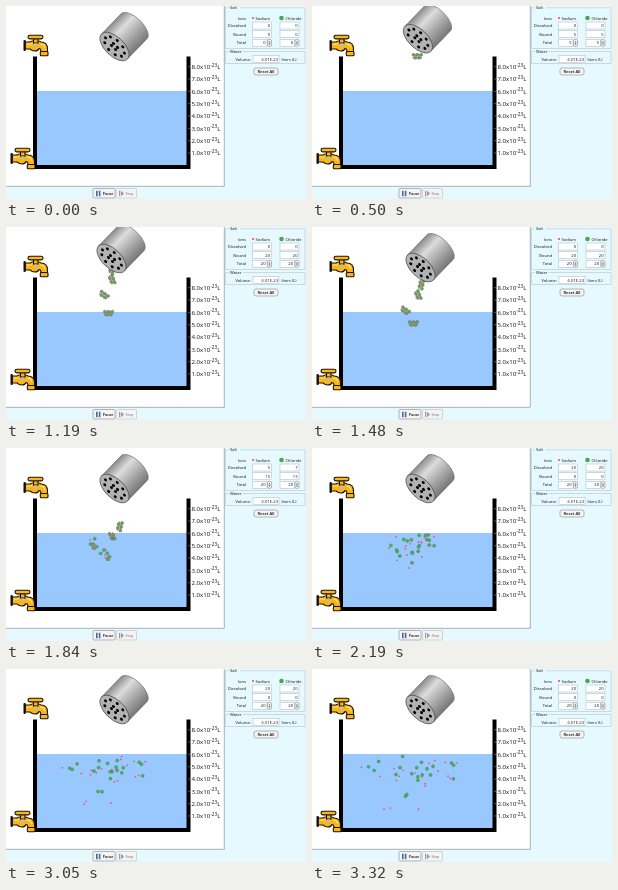
An HTML page for the animation above (3410 ms loop, 300 by 193 pixels).

```html
<!DOCTYPE html>
<html lang="en">
<head>
<meta charset="utf-8">
<title>Salt shaker</title>
<style>
html, body { margin: 0; width: 100%; height: 100%; overflow: hidden; background: #fff; }
svg { display: block; width: 100vw; height: 100vh; }
text { font-family: "Open Sans", "Noto Sans", sans-serif; font-size: 4.1px; fill: #111; }
.r { text-anchor: end; }
.m { text-anchor: middle; }
.b { font-weight: 600; }
.small { font-size: 3.7px; font-weight: 600; }
.scale { font-size: 6.1px; }
.power { font-size: 4.7px; }
.field { fill: #fff; stroke: #a9b6bf; stroke-width: .5; }
.rule { fill: none; stroke: #b5c4cb; stroke-width: .6; }
.button { fill: #f4f4f4; stroke: #888; stroke-width: .6; }
</style>
</head>
<body>
<svg viewBox="0 0 300 193" preserveAspectRatio="none">
  <defs>
    <linearGradient id="metal">
      <stop offset="0" stop-color="#8c8c8c"/>
      <stop offset=".3" stop-color="#dcdcdc"/>
      <stop offset=".65" stop-color="#a8a8a8"/>
      <stop offset="1" stop-color="#777"/>
    </linearGradient>
    <g id="faucet" stroke="#1c1400" stroke-width="1.1" fill="#f9b51c">
      <path d="M2 6H7Q9 4.500 12.500 4.500T18 6Q24.500 6 24.500 13V16H18Q18 12.500 16 12.500Q15 15 12 15T7 13H2Z"/>
      <path d="M10.500 2h4.500v5h-4.500z"/>
      <rect x="5" y="-.7" width="15" height="3.600" rx="1.800"/>
      <rect x="17.300" y="15.500" width="7.700" height="4.300" rx="1"/>
      <path d="M4 8H9M17 8Q21 8 22 12" fill="none" stroke="#ffe58a"/>
      <circle cx="12.700" cy="9" r="1.800" fill="#a5c4dc" stroke="none"/>
      <rect x=".5" y="4" width="2.300" height="11" rx="1" fill="#111" stroke="none"/>
    </g>
  </defs>

  <path d="M31 85H181V159H31Z" fill="#99c8ff"/>
  <path d="M29 50.500V161H182.500V50.500" fill="none" stroke="#000" stroke-width="4"/>
  <use href="#faucet" x="17" y="30"/>
  <use href="#faucet" x="4" y="143"/>
  <g id="scale"></g>
  <g id="ions"></g>

  <g id="shaker">
    <g transform="translate(108.500 40.500) rotate(44)">
      <path d="M-18 0V-28A18 8.500 0 0 1 18-28V0Z" fill="url(#metal)" stroke="#666" stroke-width=".6"/>
      <ellipse rx="18" ry="9.500" fill="#b2b2b2" stroke="#444" stroke-width=".7"/>
      <g id="holes"></g>
    </g>
  </g>

  <path d="M218 0H300V193H0V180H218Z" fill="#e6f9ff"/>
  <path d="M0 180.300H218.300V0" fill="none" stroke="#8b9499" stroke-width=".7"/>
  <path d="M223 1.800H219.500V42.500H299V1.800H234M223 45.500H219.500V57.500H299V45.500H237" class="rule"/>
  <text x="224" y="3.300">Salt</text>
  <text x="224" y="47">Water</text>
  <text x="240" y="13.600" class="r">Ions</text>
  <circle cx="247" cy="12" r="1" fill="#f0405c"/>
  <text x="249.500" y="13.600">Sodium</text>
  <circle cx="275.500" cy="12" r="2.300" fill="#48a850"/>
  <text x="279.500" y="13.600">Chloride</text>
  <g id="table"></g>
  <text x="245" y="54.600" class="r">Volume:</text>
  <rect x="247" y="49.700" width="26" height="7" class="field"/>
  <text x="272" y="54.700" class="r">6.01E-23</text>
  <text x="275.500" y="54.600">liters (L)</text>
  <rect x="248" y="62" width="24" height="7" rx="2" class="button"/>
  <text x="260" y="67" class="m b">Reset All</text>

  <rect x="87" y="182.500" width="22" height="9.500" rx="1" class="button"/>
  <path d="M90 184.700h1.600v5.500h-1.600zM92.800 184.700h1.600v5.500h-1.600z" fill="#456b94"/>
  <text x="96.800" y="189" class="small">Pause</text>
  <rect x="110.500" y="182.500" width="20" height="9.500" rx="1" class="button" stroke-opacity=".5"/>
  <path d="M113 184.700h1.200v5.500h-1.200zM115 184.700l3 2.750l-3 2.750z" fill="#999"/>
  <text x="119.500" y="189" class="small" fill-opacity=".45">Step</text>
</svg>
<script>
const $ = id => document.getElementById(id);
const add = (parent, markup) => parent.insertAdjacentHTML('beforeend', markup);

for (let n = 1; n <= 8; n++) {
  const y = 159.3 - n * 12.32;
  add($('scale'), `<path d="M182 ${y}h2.500" stroke="#888" stroke-width=".6"/>
    <text class="scale" x="185.500" y="${y + 2.4}">${n}.0x10<tspan class="power" dy="-2.500">-23</tspan><tspan dy="2.500">L</tspan></text>`);
}

for (const [count, rx, ry] of [[4, 4, 2], [9, 12.5, 6.3]])
  for (let i = 0; i < count; i++) {
    const a = (i + .5) * 2 * Math.PI / count;
    add($('holes'), `<ellipse cx="${rx * Math.cos(a)}" cy="${ry * Math.sin(a)}" rx="1.700" ry="1.300"/>`);
  }

['Dissolved', 'Bound', 'Total'].forEach((label, row) => {
  const y = 16 + row * 8.7;
  add($('table'), `<text x="240" y="${y + 5}" class="r">${label}</text>`);
  for (const x of [246.5, 274]) {
    const w = row == 2 ? 14.5 : 19;
    add($('table'), `<rect x="${x}" y="${y}" width="${w}" height="7" class="field"/>
      <text x="${x + w - 1.5}" y="${y + 5}" class="r value"></text>`);
    if (row == 2) add($('table'), `<rect x="${x + 15}" y="${y}" width="4" height="7" rx="1.500" class="button"/>
      <path d="M${x + 16} ${y + 3}l1-1.500l1 1.500zM${x + 16} ${y + 4.2}l1 1.500l1-1.500z" fill="#555"/>`);
  }
});
const values = document.querySelectorAll('.value');

let seed = 7;
const random = () => (seed = seed * 16807 % 2147483647) / 2147483647;

const SURFACE = 85;
const drift = [-.4, -1.6, 0, 1.1];
const crystals = [.4, 4, 7, 9].map((start, c) => ({ start, vx: drift[c], tilt: c * .6 }));

// Each crystal holds five ions of a kind, let go one after the other.
function makeIons({ radius, fill, stroke, release, side, speed }) {
  return Array.from({ length: 20 }, (_, i) => {
    const c = Math.floor(i / 5), j = i % 5, crystal = crystals[c];
    const angle = i * 2.4 + side, v = speed * (.35 + .65 * random());
    const u = (j - 2) * 1.9, w = side * (j % 2 ? 1.5 : -1.5);
    const cos = Math.cos(crystal.tilt), sin = Math.sin(crystal.tilt);
    add($('ions'), `<circle r="${radius}" fill="${fill}" stroke="${stroke}" stroke-width=".5"/>`);
    return {
      crystal, el: $('ions').lastElementChild,
      release: release + c + j * .7,
      dx: u * cos - w * sin, dy: u * sin + w * cos,
      vx: v * Math.cos(angle), vy: v * Math.sin(angle) * .75
    };
  });
}
const chloride = makeIons({ radius: 1.5, fill: '#58b060', stroke: '#35804a', release: 13.7, side: 1, speed: 2.6 });
const sodium = makeIons({ radius: .85, fill: '#ee5070', stroke: 'none', release: 14.1, side: -1, speed: 3.2 });

function place({ crystal, release, dx, dy, vx, vy }, k) {
  const age = Math.min(k, release) - crystal.start;
  const free = Math.max(0, k - release);
  let y = 42 + 5.2 * age;
  if (y > SURFACE) y = SURFACE + (y - SURFACE) * .66; // slower in water
  y += dy + vy * free;
  if (free) y = SURFACE + 1.5 + Math.abs(y - SURFACE - 1.5); // bounce off the surface
  return [106 + crystal.vx * age + dx + vx * free, y];
}

function draw(k) {
  const lift = k < 12 ? -9 * Math.abs(Math.sin(k * Math.PI / 6)) : 0;
  $('shaker').setAttribute('transform', `translate(${lift / 3} ${lift})`);
  [sodium, chloride].forEach((ions, col) => {
    let free = 0, total = 0;
    for (const ion of ions) {
      const out = k >= ion.crystal.start;
      ion.el.style.display = out ? '' : 'none';
      if (!out) continue;
      total++;
      if (k >= ion.release) free++;
      const [x, y] = place(ion, k);
      ion.el.setAttribute('cx', x);
      ion.el.setAttribute('cy', y);
    }
    [free, total - free, total].forEach((n, row) => values[row * 2 + col].textContent = n);
  });
}

// Time and step where the simulation's pace changes.
const pace = [[400, 1], [1480, 12], [2110, 19], [2190, 20], [2690, 25], [3320, 32], [3410, 33]];

function stepAt(t) {
  if (t < pace[0][0]) return 0;
  const i = pace.findIndex(([end]) => t < end);
  const [t0, k0] = pace[i - 1], [t1, k1] = pace[i];
  return Math.floor(k0 + (k1 - k0) * (t - t0) / (t1 - t0) + .05);
}

let shown = -1;
function tick() {
  const k = Math.min(32, stepAt(performance.now() % 3410));
  if (k != shown) draw(shown = k);
  requestAnimationFrame(tick);
}
tick();
</script>
</body>
</html>
```
